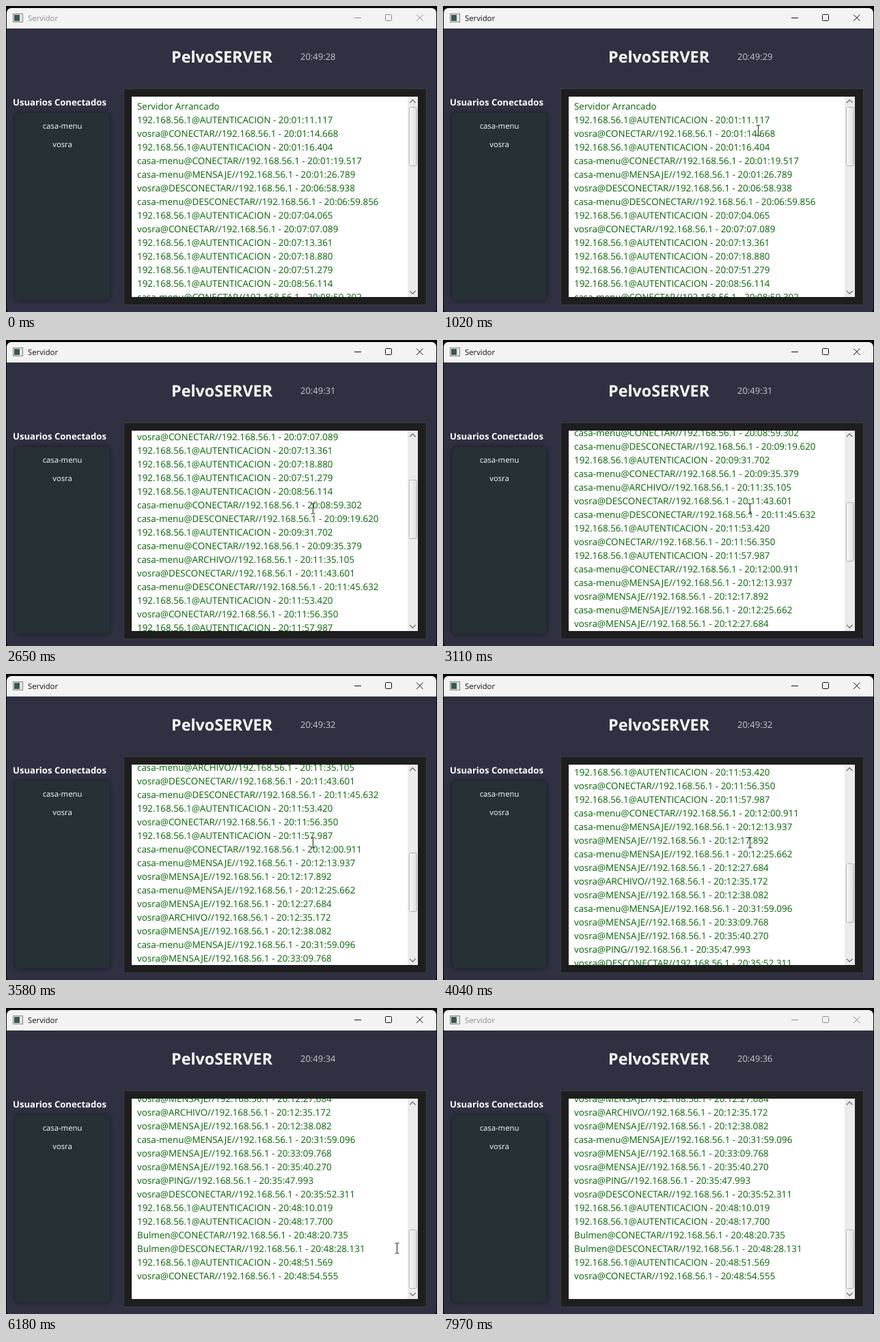
Animation, 631 px wide and 449 px high, one loop 8000 ms. Source, as an HTML page:

```html
<!DOCTYPE html>
<html lang="es">
<head>
<meta charset="utf-8">
<title>Servidor</title>
<style>
  html, body { margin: 0; width: 100%; height: 100%; overflow: hidden; background: #050505; }
  svg { display: block; font-family: "Open Sans", "Noto Sans", sans-serif; text-rendering: geometricPrecision; }
  .bold { font-weight: 700; }
  .list { font-size: 11.3px; text-anchor: middle; }
  #log { font-size: 13.42px; fill: #006400; }
  #bar { --ink: #8c8c8c; }
  #bar.active { --ink: #111; }
  #bar text { font-size: 11.3px; fill: var(--ink); }
  #bar .ctl { fill: none; stroke: var(--ink); }
  .arrow { fill: none; stroke: #707070; stroke-width: 1.3; }
  .glow { filter: drop-shadow(0 0 3px rgba(0, 0, 0, .55)); }
</style>
</head>
<body>
<svg width="631" height="449" viewBox="0 0 631 449">
  <defs>
    <clipPath id="win"><rect x="1" y="3" width="629" height="448" rx="7"/></clipPath>
    <clipPath id="view"><rect x="184" y="133" width="404" height="294"/></clipPath>
    <linearGradient id="grip">
      <stop offset="0" stop-color="#fafafa"/>
      <stop offset="1" stop-color="#dcdcdc"/>
    </linearGradient>
  </defs>

  <g clip-path="url(#win)">
    <rect width="631" height="451" fill="#2f3142"/>
    <g id="bar">
      <rect width="631" height="33" fill="#f3f3f3"/>
      <rect x="10.5" y="11.5" width="14" height="12" fill="#e4e4e4" stroke="#858585"/>
      <rect x="12" y="13" width="8" height="9" fill="#38594f"/>
      <text x="32" y="22">Servidor</text>
      <path class="ctl" d="M510 17.5h10"/>
      <rect class="ctl" x="555.5" y="12.5" width="9" height="9" rx="1"/>
      <path class="ctl" d="M601 12.5l9.5 9.5m0-9.5l-9.5 9.5"/>
    </g>

    <g fill="#fff">
      <text class="bold" x="242" y="83" font-size="23.3">PelvoSERVER</text>
      <text id="clock" x="431" y="79" font-size="13" fill="#c9cad0"></text>
      <text class="bold" x="10" y="146" font-size="13.1">Usuarios Conectados</text>
      <rect class="glow" x="13" y="157" width="139" height="275" rx="6" fill="#263035"/>
      <text class="list" x="82.5" y="180">casa-menu</text>
      <text class="list" x="82.5" y="207">vosra</text>
    </g>

    <rect x="172.5" y="121.5" width="443" height="317" fill="#1e1e1e" stroke="#3b3b40"/>
    <rect x="184" y="133" width="419" height="294" fill="#fff"/>
    <g clip-path="url(#view)"><g id="log"></g></g>

    <rect x="588" y="133" width="15" height="294" fill="#ebebeb"/>
    <path class="arrow" d="M591 142l4.3-4.3 4.3 4.3M591 418l4.3 4.3 4.3-4.3"/>
    <rect id="thumb" x="590.5" y="148.5" width="11" height="86" rx="2" fill="url(#grip)" stroke="#b4b4b4"/>
  </g>

  <path id="cursor" d="M-3-7.5h2.5l.5.5.5-.5h2.5M0-7v14M-3 7.5h2.5l.5-.5.5.5h2.5" fill="none" stroke="#1c1c1c"/>
</svg>

<script>
const $ = id => document.getElementById(id);
const LOOP = 8000;

const users = { u: 'casa-menu', v: 'vosra', b: 'Bulmen' };
const verbs = { C: 'CONECTAR', D: 'DESCONECTAR', M: 'MENSAJE', F: 'ARCHIVO', P: 'PING' };
const entries = `
  A 01:11.117  vC 01:14.668  A 01:16.404  uC 01:19.517  uM 01:26.789
  vD 06:58.938  uD 06:59.856  A 07:04.065  vC 07:07.089  A 07:13.361
  A 07:18.880  A 07:51.279  A 08:56.114  uC 08:59.302  uD 09:19.620
  A 09:31.702  uC 09:35.379  uF 11:35.105  vD 11:43.601  uD 11:45.632
  A 11:53.420  vC 11:56.350  A 11:57.987  uC 12:00.911  uM 12:13.937
  vM 12:17.892  uM 12:25.662  vM 12:27.684  vF 12:35.172  vM 12:38.082
  uM 31:59.096  vM 33:09.768  vM 35:40.270  vP 35:47.993  vD 35:52.311
  A 48:10.019  A 48:17.700  bC 48:20.735  bD 48:28.131  A 48:51.569
  vC 48:54.555`;

const ip = '192.168.56.1';
const describe = ([who, verb]) =>
  who === 'A' ? `${ip}@AUTENTICACION` : `${users[who]}@${verbs[verb]}//${ip}`;
const lines = ['Servidor Arrancado'];
for (const [, code, time] of entries.matchAll(/(\w+) (\S+)/g))
  lines.push(`${describe(code)} - 20:${time}`);

lines.forEach((line, i) => {
  const text = document.createElementNS('http://www.w3.org/2000/svg', 'text');
  text.setAttribute('x', 192);
  text.setAttribute('y', 152 + 20 * i);
  text.textContent = line;
  $('log').append(text);
});

// Wheel notches and clock ticks, in ms
const notches = [1500, 1710, 2040, 2180, 2250, 2310, 2650, 2710, 2840, 2910, 3110,
  3180, 3310, 3580, 3780, 4040, 4370, 4570, 4830, 5030, 5360, 5630];
const ticks = [470, 1500, 2510, 3510, 4440, 5430, 6440, 7440];
const STEP = 26.45, MAX_SCROLL = 574, TRAVEL = 177;

// Pointer keys: time, x, y
const path = [
  [70, 558, 415], [210, 390, 201], [400, 390, 201], [1160, 486, 175],
  [1770, 486, 175], [2040, 449, 247], [5830, 449, 247], [6180, 572, 352],
  [7170, 572, 352], [7310, 580, 417], [7440, 580, 417]
];

const passed = (times, t) => times.filter(at => at <= t).length;

function pointerAt(t) {
  const i = path.findIndex(key => key[0] > t);
  if (i < 1) return null;
  const [t0, x0, y0] = path[i - 1], [t1, x1, y1] = path[i];
  const p = Math.floor((t - t0) / 70) * 70 / (t1 - t0);
  return [x0 + (x1 - x0) * p, y0 + (y1 - y0) * p].map(v => Math.round(v) + .5);
}

function draw(t) {
  const scroll = Math.min(MAX_SCROLL, Math.round(passed(notches, t) * STEP));
  $('log').setAttribute('transform', `translate(0 ${-scroll})`);
  $('thumb').setAttribute('y', 148.5 + Math.round(scroll / MAX_SCROLL * TRAVEL));
  $('clock').textContent = `20:49:${28 + passed(ticks, t)}`;
  $('bar').classList.toggle('active', t >= 600 && t < 7970);
  const at = pointerAt(t);
  $('cursor').style.visibility = at ? 'visible' : 'hidden';
  if (at) $('cursor').setAttribute('transform', `translate(${at})`);
}

const start = performance.now();
function frame() {
  draw((performance.now() - start) % LOOP);
  requestAnimationFrame(frame);
}
frame();
</script>
</body>
</html>
```
